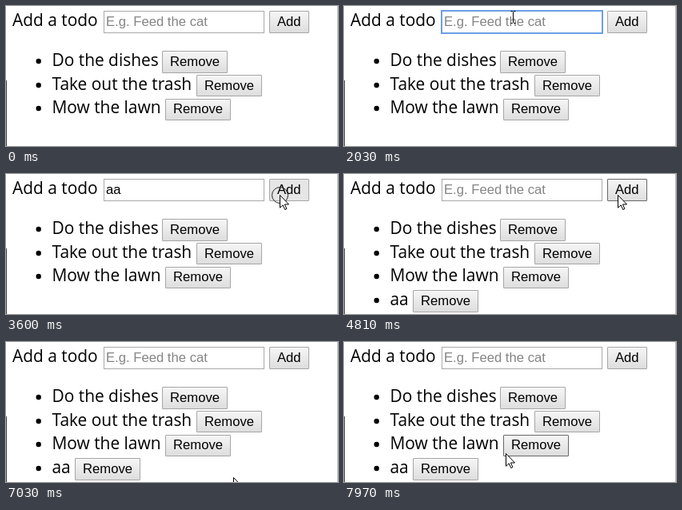
An HTML page that plays this animation: 415x175 px, repeating every 8000 ms.

```html
<!DOCTYPE html>
<html lang="en">
<head>
<meta charset="utf-8">
<title>Todo list</title>
<style>
  html, body { margin: 0; width: 100%; height: 100%; overflow: hidden; background: #fff; }
  svg { display: block; width: 415px; height: 175px; }
  .body { font: 20.9px "Open Sans", "Noto Sans", sans-serif; }
  .ui { font: 16.67px "Liberation Sans", Arial, sans-serif; }
</style>
</head>
<body>
<svg id="stage" viewBox="0 0 415 175">
  <defs>
    <linearGradient id="face" x2="0" y2="1">
      <stop stop-color="#f6f6f6"/><stop offset="1" stop-color="#dddddd"/>
    </linearGradient>
  </defs>
</svg>
<script>
const LOOP = 8000;
const BUTTON_HEIGHT = 27.25;
const stage = document.getElementById("stage");

function add(tag, attrs, parent = stage, text = "") {
  const el = document.createElementNS("http://www.w3.org/2000/svg", tag);
  for (const key in attrs) el.setAttribute(key, attrs[key]);
  el.textContent = text;
  return parent.appendChild(el);
}

const baseline = top => Math.round(top + 18.6);

// Layout tops are fractional; edges snap to whole pixels.
function addButton(x, top, width, label, parent = stage) {
  const y = Math.round(top);
  const height = Math.round(top + BUTTON_HEIGHT) - y;
  const box = add("rect", {
    x: x + .5, y: y + .5, width: width - 1, height: height - 1, rx: .5
  }, parent);
  add("text", { x: x + 10, y: baseline(top), class: "ui" }, parent, label);
  return (hover, pressed) => {
    box.setAttribute("stroke", hover && !pressed ? "#686868" : "#a6a6a6");
    box.setAttribute("fill", pressed ? "#e6e6e6" : "url(#face)");
  };
}

function addRow(label, buttonX, index) {
  const top = 56.4 + index * 29.67;
  const y = baseline(top);
  const row = add("g", {});
  add("circle", { cx: 40.7, cy: y - 6, r: 3.2 }, row);
  add("text", { x: 57.5, y, class: "body" }, row, label);
  return { row, paint: addButton(buttonX, top, 82, "Remove", row), x: buttonX, top };
}

const show = (el, on) => el.setAttribute("visibility", on ? "visible" : "hidden");

// Window edges
add("path", { d: "M.5 93V175", stroke: "#444" });
add("path", { d: "M414.5 0V175", stroke: "#bbb" });

add("text", { x: 8, y: 25, class: "body" }, stage, "Add a todo");
const field = add("rect", { fill: "#fff" });
const fieldText = add("text", { x: 125, y: 25, class: "ui" });
const caret = add("path", { stroke: "#000" });
const paintAdd = addButton(329, 6.4, 50, "Add");

const rows = [
  ["Do the dishes", 195],
  ["Take out the trash", 238],
  ["Mow the lawn", 199],
  ["aa", 86]
].map(([label, buttonX], index) => addRow(label, buttonX, index));

const ring = add("circle", { r: 10, fill: "none", stroke: "#222" });
const arrow = add("path", {
  d: "M.5.5V16.2L4.2 12.8 6.7 18.5 8.9 17.5 6.4 12H11.5Z", fill: "#fff", stroke: "#000"
});
const beam = add("path", {
  d: "M-3-8H-1L0-7 1-8H3M0-7V6M-3 7H-1L0 6 1 7H3", fill: "none", stroke: "#000"
});

// Pointer stops: time, x, y, shape
const pointer = [
  [0, 0, 0, ""],
  [500, 256, 158, "arrow"],
  [650, 241, 76, "arrow"],
  [770, 214, 25, "beam"],
  [890, 214, 14, "beam"],
  [1170, 213, 14, "beam"],
  [1320, 211, 14, "beam"],
  [3210, 262, 18, "beam"],
  [3330, 334, 24, "arrow"],
  [3450, 342, 25, "arrow"],
  [3600, 342, 26, "arrow"],
  [4930, 341, 50, "arrow"],
  [5080, 346, 93, "arrow"],
  [5230, 381, 152, "arrow"],
  [5350, 0, 0, ""],
  [7030, 284, 169, "arrow"],
  [7150, 173, 166, "arrow"],
  [7300, 158, 156, "arrow"],
  [7580, 206, 138, "arrow"],
  [7730, 193, 139, "arrow"],
  [7850, 199, 139, "arrow"],
  [7970, 202, 139, "arrow"]
];

function render(t) {
  const within = (from, to) => t >= from && t < to;
  const [since, x, y, shape] = pointer.findLast(stop => stop[0] <= t);
  const over = (left, top, width) => shape === "arrow" && since !== 7580 &&
    x >= left && x < left + width && y >= top && y < top + BUTTON_HEIGHT;

  const focused = within(1600, 3600);
  const typed = within(2560, 2960) ? "a" : within(2960, 3750) ? "aa" : "";
  const inset = focused ? 0 : .5;
  field.setAttribute("x", 122 + inset);
  field.setAttribute("y", 6 + inset);
  field.setAttribute("width", 201 - 2 * inset);
  field.setAttribute("height", 28 - 2 * inset);
  field.setAttribute("stroke", focused ? "#6b9fe6" : "#a9a9a9");
  field.setAttribute("stroke-width", focused ? 2 : 1);
  fieldText.textContent = typed || "E.g. Feed the cat";
  fieldText.setAttribute("fill", typed ? "#000" : "#858585");

  const caretX = 125.5 + Math.floor(typed.length * 9.27);
  caret.setAttribute("d", `M${caretX} 11V29`);
  show(caret, within(1600, 2030) || within(2560, 3450));

  paintAdd(over(329, 6.4, 50), within(3600, 3750));
  for (const item of rows) item.paint(over(item.x, item.top, 82), false);
  show(rows[3].row, t >= 3750);

  const center = `translate(${x + .5} ${y + .5})`;
  arrow.setAttribute("transform", `translate(${x} ${y})`);
  beam.setAttribute("transform", center);
  ring.setAttribute("transform", center);
  show(arrow, shape === "arrow");
  show(beam, shape === "beam");
  show(ring, within(1600, 1760) || within(3600, 3750));
}

const start = performance.now();
function tick() {
  render((performance.now() - start) % LOOP);
  requestAnimationFrame(tick);
}
tick();
</script>
</body>
</html>
```
